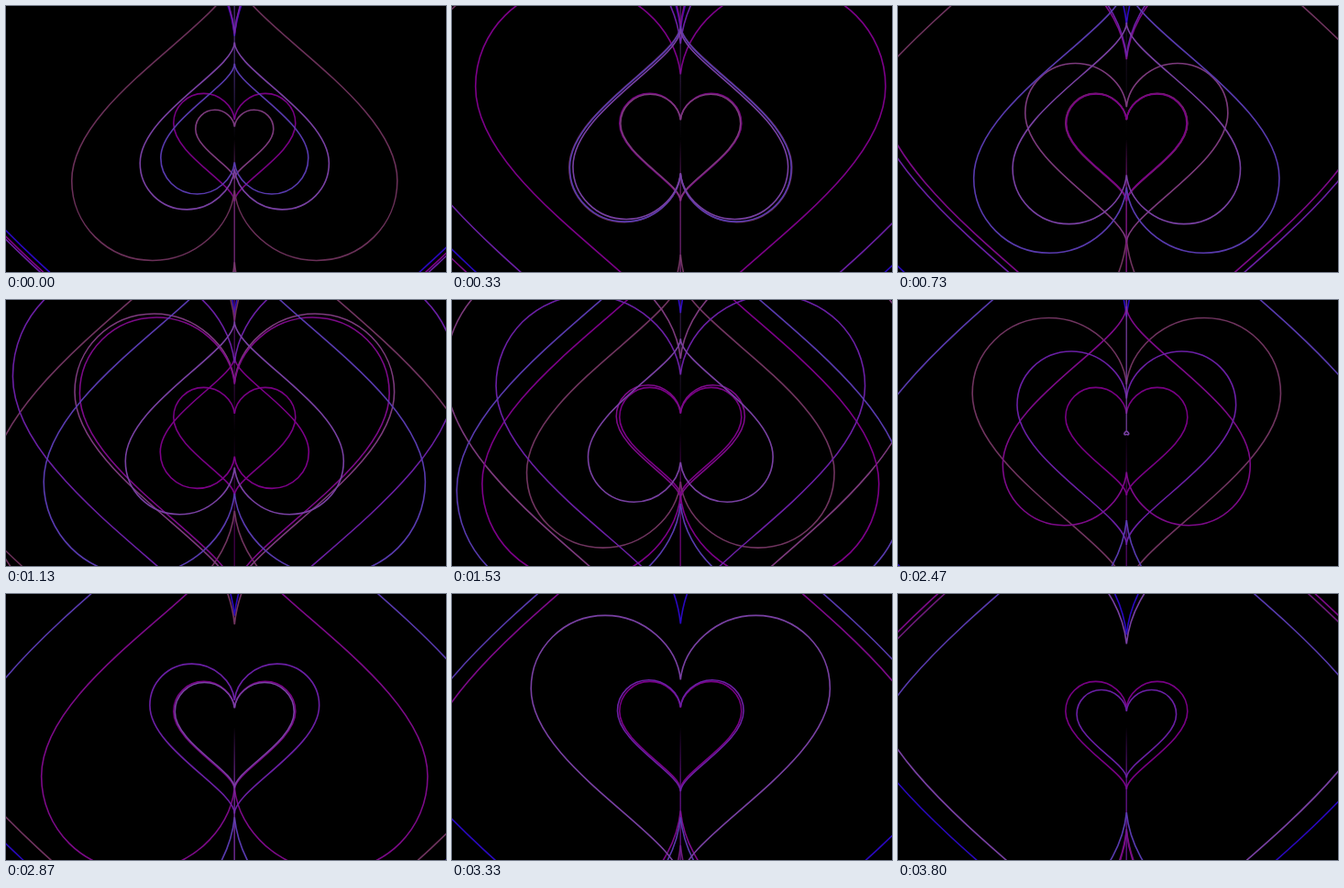
Write an HTML page with a canvas that moves like this. It is 480 by 290 pixels and loops after 3.99 s.

```html
<!DOCTYPE html>
<html lang="en">
<head>
<meta charset="utf-8">
<title>Pulsing hearts</title>
<style>
html, body { margin: 0; width: 100%; height: 100%; overflow: hidden; background: #000; }
canvas { display: block; width: 480px; height: 290px; }
</style>
</head>
<body>
<canvas id="stage" width="480" height="290"></canvas>
<script>
const ctx = document.getElementById('stage').getContext('2d');
const LOOP = 3990, CX = 249.3, CY = 145, TIP = 68;

// The picture changes only at these times and is held in between.
const steps = [0, 330, 730, 800, 870, 1130, 1530, 1600, 1730, 2000,
  2470, 2530, 2870, 2930, 3000, 3330, 3400, 3800];

// A heart's scale is a cubic in seconds; a negative scale turns it upside down.
const heart = (color, start, speed = 0, accel = 0, jerk = 0) => ({
  color,
  scaleAt: t => start + t * (speed + t * (accel + t * jerk))
});

const hearts = [
  heart('#780084', 1),
  heart('#2a08c0', 5.35, 1.064, -0.319),
  heart('#6c1a78', -12, 1.763),
  heart('#70345f', -6.4, 0.85, 1.07, 0.02),
  heart('#6a3058', -2.67, 0.52, 6.17),
  heart('#7c3a7c', 0.639, 0.75, 0.9, -0.01),
  heart('#7c0088', 5.45, -6.5, 0.53),
  heart('#7c0a88', 7.3, -4.58, 0.325),
  heart('#6a1fa4', 5.5, -1.678, -0.012, 0.034),
  heart('#583aae', -1.21, -1.882, 0.116, 0.041),
  heart('#7840a2', -1.55, -0.818, 0.5, 0.032)
];

function drawOutline(s, color) {
  ctx.save();
  ctx.translate(CX, CY);
  ctx.scale(s, s);
  ctx.beginPath();
  for (const m of [1, -1]) {
    ctx.moveTo(0, -21);
    ctx.bezierCurveTo(1.5 * m, -36, 16 * m, -49.6, 33.5 * m, -49.6);
    ctx.bezierCurveTo(52 * m, -49.6, 66.5 * m, -35, 66.5 * m, -17);
    ctx.bezierCurveTo(66.5 * m, 17, 0, 49, 0, TIP);
  }
  ctx.restore();
  ctx.strokeStyle = color;
  ctx.stroke();
}

// Line along the axis that brightens towards the tip and runs on past it.
function drawSpike(s, color) {
  const dir = Math.sign(s);
  const fade = ctx.createLinearGradient(0, CY, 0, CY + s * TIP);
  fade.addColorStop(0, color + '00');
  fade.addColorStop(1, color);
  ctx.fillStyle = fade;
  ctx.globalAlpha = Math.max(0, 1 - Math.abs(s) / 2.5);
  ctx.fillRect(CX - 0.7, CY, 1.2, dir * CY);
  ctx.globalAlpha = 1;
}

function draw(ms) {
  ctx.fillStyle = '#000';
  ctx.fillRect(0, 0, 480, 290);
  ctx.lineWidth = 1.6;
  ctx.lineJoin = 'round';
  for (const { color, scaleAt } of hearts) {
    const s = scaleAt(ms / 1000);
    if (Math.abs(s) < 0.01) continue;
    drawSpike(s, color);
    drawOutline(s, color);
  }
}

const start = performance.now();
let shown = -1;
function tick() {
  const t = (performance.now() - start) % LOOP;
  const step = steps.filter(x => x <= t).pop();
  if (step !== shown) draw(shown = step);
  requestAnimationFrame(tick);
}
tick();
</script>
</body>
</html>
```
